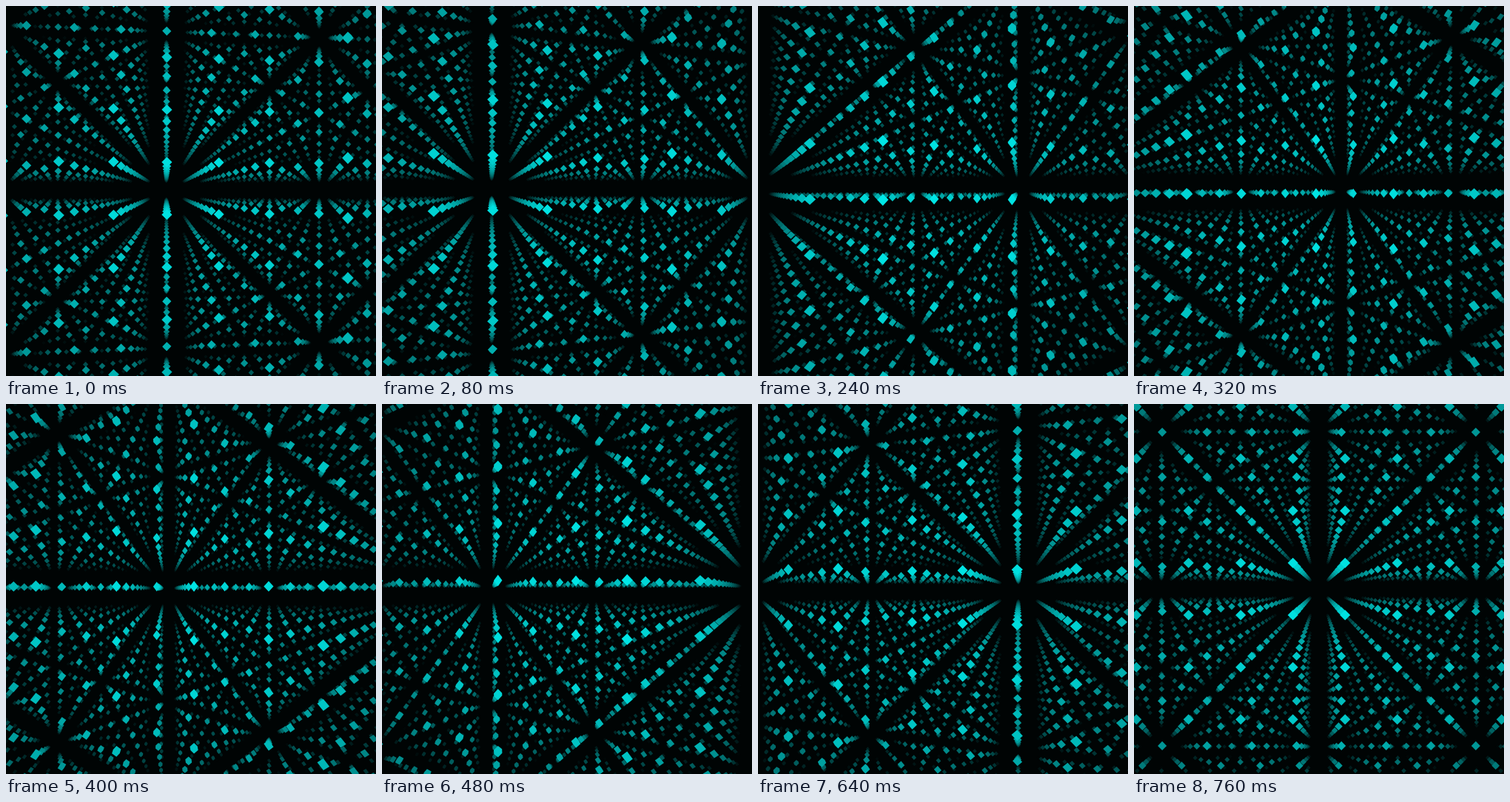
These frames come from a looping animation (500x500 px, 800 ms). An HTML page with a canvas:

```html
<!DOCTYPE html>
<html>
<head>
<meta charset="utf-8">
<style>
html, body { margin: 0; width: 100%; height: 100%; overflow: hidden; background: #000404; }
canvas { display: block; }
</style>
</head>
<body>
<canvas width="500" height="500"></canvas>
<script>
const ctx = document.querySelector('canvas').getContext('2d');
const STEPS = 20, STEP_MS = 40;
const FOCAL = 428, ORBIT = 6.57, NEAR = 5.25, FAR = 19, RADIUS = 0.1, REACH = 24;

// Adds the parallelogram ±a, ±b around (x, y), always wound the same way.
function quad(x, y, a, b) {
  if (a[0] * b[1] < a[1] * b[0]) [a, b] = [b, a];
  ctx.moveTo(x + a[0], y + a[1]);
  ctx.lineTo(x + b[0], y + b[1]);
  ctx.lineTo(x - a[0], y - a[1]);
  ctx.lineTo(x - b[0], y - b[1]);
  ctx.closePath();
}

// Lattice points in view, farthest first.
function visiblePoints(phase, sin, cos) {
  const points = [];
  for (let i = -REACH; i < REACH; i++) {
    for (let k = -REACH; k < REACH; k++) {
      const x = (i + 0.5) * cos - (k + 0.5) * sin;
      const z = (i + 0.5) * sin + (k + 0.5) * cos + ORBIT;
      const limit = z * 0.6 + 0.2;
      if (z < NEAR || z > FAR || Math.abs(x) > limit) continue;
      for (let j = Math.ceil(-limit) - 1; j < limit; j++) {
        const y = j + 0.5 - phase;
        const dist = Math.hypot(x, y, z);
        if (dist < FAR) points.push({ x, y, z, dist });
      }
    }
  }
  return points.sort((p, q) => q.dist - p.dist);
}

function draw(phase) {
  const angle = phase * Math.PI / 2, sin = Math.sin(angle), cos = Math.cos(angle);
  ctx.fillStyle = '#000404';
  ctx.fillRect(0, 0, 500, 500);
  for (const { x, y, z, dist } of visiblePoints(phase, sin, cos)) {
    const scale = FOCAL / z, size = RADIUS * scale;
    const px = 250 + x * scale, py = 250 + y * scale;
    // Screen directions of the octahedron's three axes.
    const axis = (dx, dy, dz) => [size * (dx - dz * x / z), size * (dy - dz * y / z)];
    const a = axis(cos, 0, sin), b = axis(0, 1, 0), c = axis(-sin, 0, cos);
    // Fades with distance and away from the centre of the view.
    const light = 4 + 236 * (FAR - dist) / (FAR - NEAR) * z / dist;
    ctx.fillStyle = `rgb(0 ${light} ${light})`;
    ctx.beginPath();
    quad(px, py, a, b);
    quad(px, py, b, c);
    quad(px, py, c, a);
    ctx.fill();
  }
}

function tick() {
  const step = Math.floor(performance.now() / STEP_MS) % STEPS;
  draw((step + 1) / STEPS);
  requestAnimationFrame(tick);
}
tick();
</script>
</body>
</html>
```
